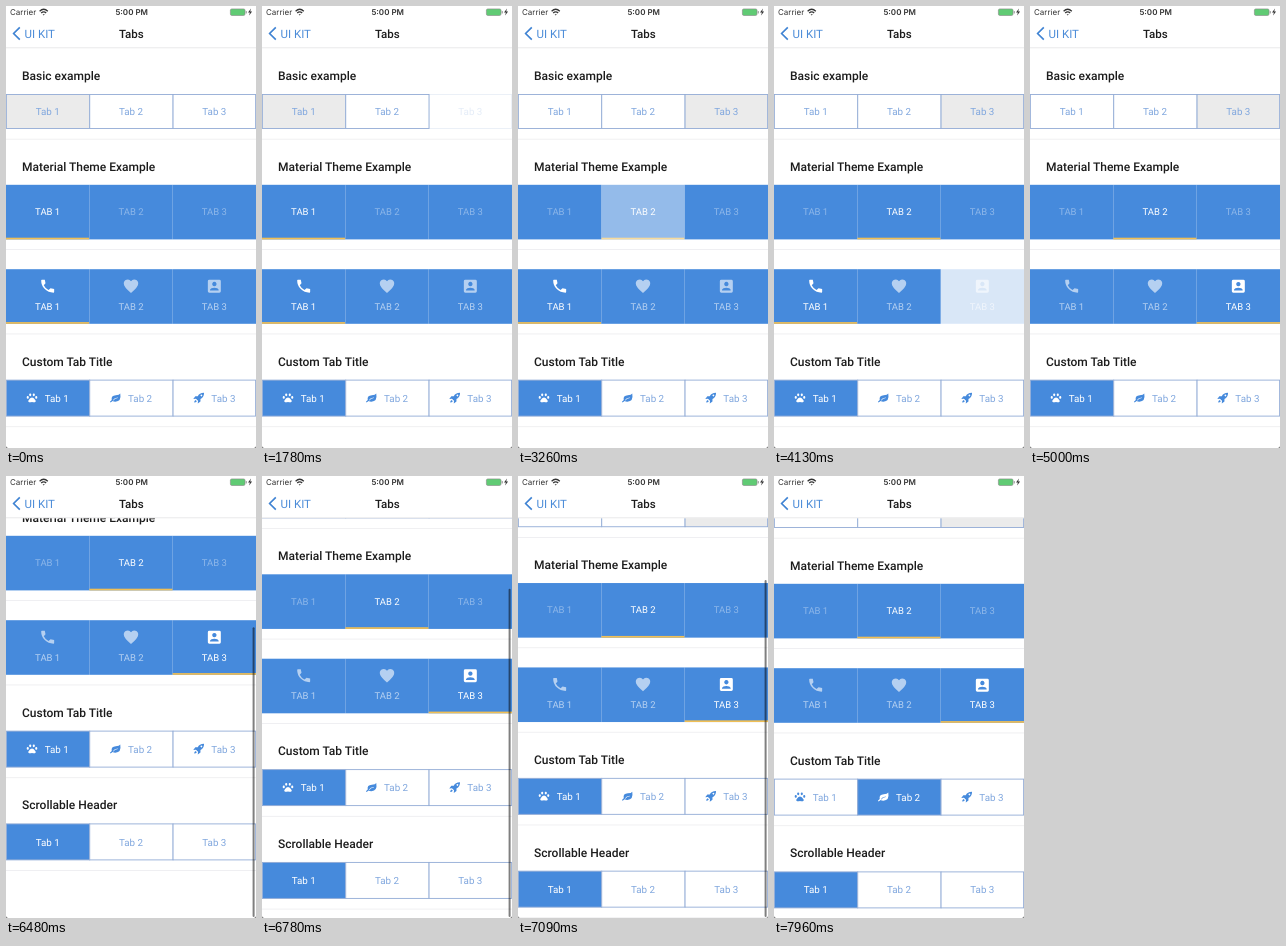
These frames come from a looping animation (250 px wide and 442 px high, 8 s). An HTML page:

```html
<!DOCTYPE html>
<html lang="en">
<head>
<meta charset="utf-8">
<title>Tabs</title>
<style>
  html, body { margin: 0; width: 100%; height: 100%; overflow: hidden; background: #555; }
  svg { display: block; width: 250px; height: 442px; background: #fff; border-radius: 0 0 2.5px 2.5px; }
  text { font-family: Roboto, "Open Sans", sans-serif; white-space: pre; text-rendering: geometricPrecision; }
  .title { font-size: 12px; font-weight: 500; fill: #1c1c1c; }
  .tab { font-size: 9.8px; }
  .caps { font-size: 9.5px; }
  .status { font: 8px Inter, "Liberation Sans", sans-serif; fill: #333; }
  .nav { font-size: 11.5px; }
</style>
</head>
<body>
<svg viewBox="0 0 250 442">
  <g id="page"></g>
  <rect id="thumb" x="246.6" width="2" rx="1" fill="#000" fill-opacity=".5"/>
  <g id="header">
    <rect width="250" height="42.2" fill="#fff"/>
    <rect y="41.5" width="250" height=".7" fill="#dfdfe1"/>
    <text class="status" x="4" y="9">Carrier</text>
    <g fill="none" stroke="#333" stroke-width="1.3">
      <path d="M33.6 5.2Q37.7 1.4 41.8 5.2M35.2 7Q37.7 4.7 40.2 7"/>
      <path d="M36.6 8.2h2.2l-1.1 1.2z" fill="#333" stroke="none"/>
    </g>
    <text class="status" x="125.7" y="9" text-anchor="middle" font-weight="600" style="font-weight:600">5:00 PM</text>
    <rect x="224.4" y="2.9" width="14.6" height="6.6" rx="1.4" fill="#60cb74" stroke="#888" stroke-width=".6"/>
    <rect x="239.7" y="4.9" width="1" height="2.6" rx=".5" fill="#888"/>
    <path d="M245 2.6l-3 4h1.9l-.8 3 3-4.1h-1.9z" fill="#333"/>
    <path d="M13.8 21.4L7.6 27.5l6.2 6.1" fill="none" stroke="#3f83d3" stroke-width="1.6"/>
    <text class="nav" x="18.5" y="31.6" fill="#4c8cd8">UI KIT</text>
    <text class="nav" x="125.4" y="31.6" font-weight="500" text-anchor="middle" fill="#1c1c1c">Tabs</text>
  </g>
</svg>
<script>
const LOOP = 8000, TOP = 42, VIEW = 400, MAX_SCROLL = 71, PULL = 119;
const COLUMN = 250 / 3;
const BLUE = '#468adc', SOFT_BLUE = '#80a7de', BORDER = '#93acd6', GOLD = '#f0bf55', GREY = '#ebebeb';
const page = document.getElementById('page');
const thumb = document.getElementById('thumb');

// Drawn in a 24 unit box.
const MATERIAL_ICONS = [
  'M4 3h4l1 5-2.4 2.8q2 4.4 6.6 6.6L16 15l5 1v4q0 1-1 1A17 17 0 0 1 3 4q0-1 1-1z',
  'M12 21.3Q2 13 2 8.5A5.5 5.5 0 0 1 12 5.1A5.5 5.5 0 0 1 22 8.5Q22 13 12 21.3z',
  'M5 3h14q2 0 2 2v14q0 2-2 2H5q-2 0-2-2V5q0-2 2-2zM12 6a3 3 0 1 0 .1 0zM6 18h12v-1q-1-3-6-3t-6 3z'
];

// Drawn in a 12 unit box.
const toe = (x, y) => `M${x - 1.2} ${y}a1.2 1.6 0 1 1 2.4 0a1.2 1.6 0 1 1-2.4 0z`;
const TITLE_ICONS = [
  'M6 5.2Q8 5.2 10 8.7Q11 11.3 6 10.4Q1 11.3 2 8.7Q4 5.2 6 5.2z' + toe(4, 2.4) + toe(8, 2.4) + toe(1.3, 5.2) + toe(10.7, 5.2),
  'M11.5 1Q13 10 6 10Q4 10 3 9.3L.8 11 0 10 2 8Q1 3 6.5 2.7Q10.5 2.7 11.5 1zM3.2 8.3Q5 5.5 8.8 5.3V6Q5.5 6.3 3.8 8.7z',
  'M12 0Q6.5 0 5 4H2.3L0 7l3-.3L5.3 9 5 12l3-2.3V7Q12 5 12 0zM9 2a1 1 0 1 0 .1 0zM2.6 8Q1 9 1 11 3 11 4 9.4z'
];

function add(parent, tag, attrs, content) {
  const node = document.createElementNS('http://www.w3.org/2000/svg', tag);
  for (const name in attrs) node.setAttribute(name, attrs[name]);
  if (content) node.textContent = content;
  return parent.appendChild(node);
}

function addIcon(parent, d, cx, cy, size, box) {
  const transform = `translate(${cx - size / 2} ${cy - size / 2}) scale(${size / box})`;
  add(parent, 'path', { d, 'fill-rule': 'evenodd', transform });
}

// A tab builder fills its group and returns a function that shows it active or not.
function outlined(height, activeFill, activeText, icons) {
  return { height, build(group, i, x, y) {
    const mid = y + height / 2;
    const back = add(group, 'rect', {
      x: x + .4, y: y + .5, width: i === 2 ? COLUMN - .8 : COLUMN, height: height - 1,
      stroke: BORDER, 'stroke-width': .9
    });
    const label = add(group, 'text', {
      class: 'tab', x: x + (icons ? 38.7 : COLUMN / 2), y: mid + 3.6,
      'text-anchor': icons ? 'start' : 'middle'
    }, `Tab ${i + 1}`);
    const mark = add(group, 'g', {});
    if (icons) addIcon(mark, icons[i], x + 26, mid, 10.8, 12);
    return on => {
      back.setAttribute('fill', on ? activeFill : '#fff');
      label.setAttribute('fill', on ? activeText : SOFT_BLUE);
      mark.setAttribute('fill', on ? activeText : BLUE);
    };
  } };
}

function material(dim, icons) {
  const height = 54.6;
  return { height, build(group, i, x, y) {
    const cx = x + COLUMN / 2;
    add(group, 'rect', { x, y, width: COLUMN, height, fill: BLUE });
    const body = add(group, 'g', { fill: '#fff' });
    if (icons) addIcon(body, icons[i], cx, y + 17, 17.3, 24);
    add(body, 'text', {
      class: 'caps', x: cx, y: y + (icons ? 40.3 : 30.4), 'text-anchor': 'middle'
    }, `TAB ${i + 1}`);
    const line = add(group, 'rect', { x, y: y + height - 1.7, width: COLUMN, height: 1.7, fill: GOLD });
    return on => {
      body.setAttribute('opacity', on ? 1 : dim);
      line.setAttribute('opacity', on ? 1 : 0);
    };
  } };
}

// Sections stack downwards, each closed by a thin divider.
let cursor = TOP;
function section(title, { height, build }) {
  if (title) add(page, 'text', { class: 'title', x: 16, y: cursor + 32 }, title);
  const y = cursor + (title ? 46 : 20);
  const tabs = [0, 1, 2].map(i => {
    const group = add(page, 'g', {});
    return { group, select: build(group, i, i * COLUMN, y) };
  });
  cursor = y + height + 9.8;
  add(page, 'rect', { y: cursor, width: 250, height: .7, fill: '#e9e9ec' });
  return tabs;
}

const basic = section('Basic example', outlined(35, GREY, SOFT_BLUE));
const plain = section('Material Theme Example', material(.38));
const iconic = section('', material(.6, MATERIAL_ICONS));
const custom = section('Custom Tab Title', outlined(37, BLUE, '#fff', TITLE_ICONS));
const scrollable = section('Scrollable Header', outlined(37, BLUE, '#fff'));

const clamp = p => Math.min(1, Math.max(0, p));
const progress = (t, start, length) => clamp((t - start) / length);
const inOut = p => p < .5 ? 2 * p * p : 1 - 2 * (1 - p) ** 2;
const smooth = p => p * p * (3 - 2 * p);

// A touched tab fades out on press and back in on release.
const PRESS = 140, RELEASE = 270;
const touchFade = (t, down, up) =>
  1 - .8 * (inOut(progress(t, down, PRESS)) - inOut(progress(t, up, RELEASE)));

const TOUCHES = [
  { tabs: basic, to: 2, down: 1640, up: 1790 },
  { tabs: plain, to: 1, down: 2980, up: 3130 },
  { tabs: iconic, to: 2, down: 3990, up: 4300 },
  { tabs: custom, to: 1, down: 5940, up: 6100, cancelled: true }
];
const TAP = 7870, TAP_END = 7955;
const DRAG = 5915, LET_GO = 6480;

function scrollAt(t) {
  if (t < LET_GO) return PULL * smooth(progress(t, DRAG, LET_GO - DRAG));
  const s = (t - LET_GO) / 100;
  return MAX_SCROLL + (PULL - MAX_SCROLL) * (1 + s) * Math.exp(-s);
}

function activate(tabs, index) {
  tabs.forEach((tab, i) => tab.select(i === index));
}

function drawThumb(t, scroll) {
  const ratio = VIEW / (VIEW + MAX_SCROLL);
  const over = Math.max(0, scroll - MAX_SCROLL);
  const height = VIEW * ratio - over;
  thumb.setAttribute('height', height - 2);
  thumb.setAttribute('y', TOP + 1 + (over ? VIEW - height : scroll * ratio));
  thumb.setAttribute('opacity', progress(t, DRAG + 30, 30) - progress(t, 7250, 270));
}

function draw(t) {
  for (const { tabs, to, down, up, cancelled } of TOUCHES) {
    const chosen = t >= (cancelled ? TAP_END : up);
    activate(tabs, chosen ? to : 0);
    const tapped = cancelled && t >= TAP && t < TAP_END;
    tabs[to].group.setAttribute('opacity', tapped ? .6 : touchFade(t, down, up));
  }
  const scroll = scrollAt(t);
  page.setAttribute('transform', `translate(0 ${-scroll})`);
  drawThumb(t, scroll);
}

activate(scrollable, 0);
const start = performance.now();
(function tick() {
  draw((performance.now() - start) % LOOP);
  requestAnimationFrame(tick);
})();
</script>
</body>
</html>
```
